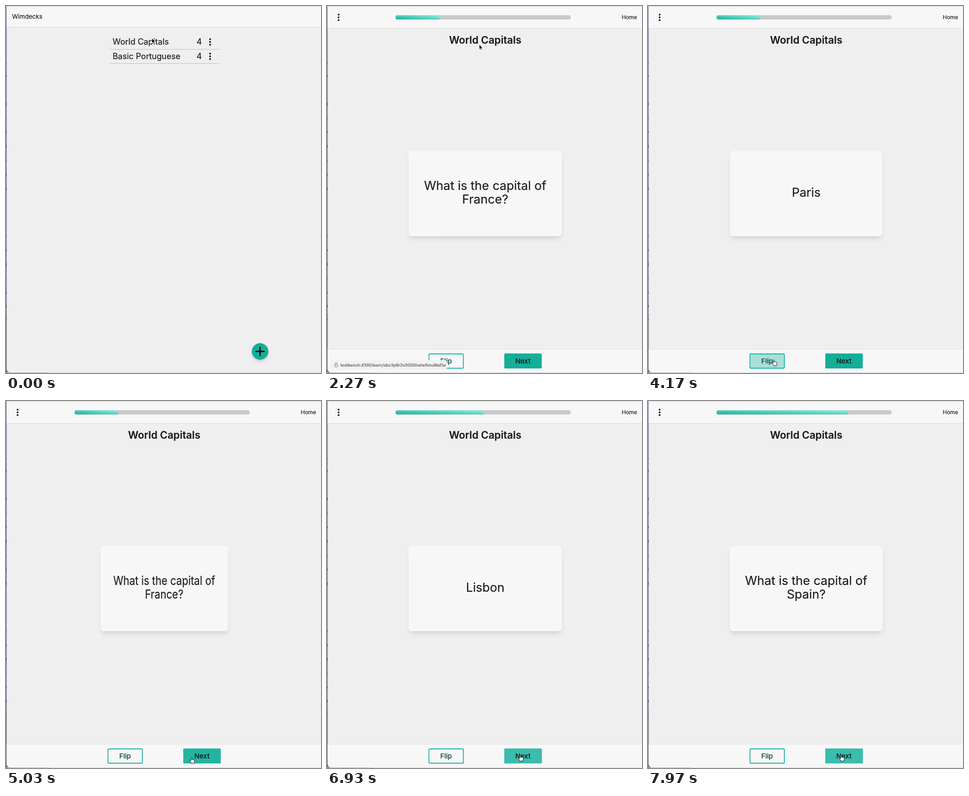
Write an HTML page that moves like this. It is 693 by 808 pixels and loops after 8000 ms.

```html
<!DOCTYPE html>
<html lang="en">
<head>
<meta charset="utf-8">
<title>Flashcards</title>
<style>
  html, body { margin: 0; width: 100%; height: 100%; overflow: hidden; background: #efefef; }
  svg { display: block; width: 100vw; height: 100vh; }
  text {
    --ink: #1c1c1e;
    font-family: Inter, Roboto, sans-serif; font-optical-sizing: none; white-space: pre;
    fill: var(--ink); stroke: var(--ink); stroke-width: .2;
  }
  .mid { text-anchor: middle; }
  .row { font-size: 18px; }
  .btn { font-size: 15px; font-weight: 500; text-anchor: middle; }
  .face { font-size: 27px; text-anchor: middle; }
</style>
</head>
<body>
<svg viewBox="0 0 693 808" preserveAspectRatio="none">
  <defs>
    <linearGradient id="teal" x1="0" y1="1" x2="1" y2="0">
      <stop offset="0" stop-color="#14ae99"/>
      <stop offset="1" stop-color="#93f1de"/>
    </linearGradient>
    <filter id="soft" x="-20%" y="-20%" width="140%" height="140%"><feGaussianBlur stdDeviation="5.6"/></filter>
    <filter id="tight" x="-20%" y="-20%" width="140%" height="140%"><feGaussianBlur stdDeviation="2.25"/></filter>
    <clipPath id="track"><rect x="150.5" y="20.3" width="386" height="9.4" rx="4.7"/></clipPath>
    <clipPath id="win"><path d="M1.5 1H693V807H9.5a8 8 0 0 1-8-8z"/></clipPath>
    <g id="dots"><circle cy="-6" r="2"/><circle r="2"/><circle cy="6" r="2"/></g>
  </defs>

  <rect width="693" height="808" fill="#d6d3de"/>
  <rect width="693" height="1" fill="#cbc5e2"/>
  <rect y="1" width="12" height="675" fill="#7d7596"/>
  <rect y="676" width="12" height="132" fill="#6d6780"/>
  <rect y="806" width="93" height="2" fill="#a9a5b2"/>
  <g id="specks" fill="#26222e"></g>

  <g clip-path="url(#win)">
    <rect width="693" height="808" fill="#efefef"/>

    <g id="home">
      <rect width="693" height="46" fill="#f7f7f7"/>
      <rect y="46" width="693" height="1" fill="#dcdcdc"/>
      <text x="13.3" y="28" font-size="13.5">Wimdecks</text>
      <rect id="rowHover" x="227.5" y="64" width="241" height="31" fill="#dfe1e5"/>
      <g id="rows"></g>
      <circle cx="559" cy="765" r="16" opacity=".16" filter="url(#soft)"/>
      <circle cx="559" cy="763" r="16" opacity=".14" filter="url(#tight)"/>
      <circle cx="559" cy="760.5" r="18.2" fill="#14ae99"/>
      <path d="M549.8 760.5h18.4M559 751.3v18.4" stroke="#111" stroke-width="3" stroke-linecap="round"/>
    </g>

    <g id="study">
      <rect width="693" height="49" fill="#f7f7f7"/>
      <rect y="49" width="693" height="1" fill="#dadada"/>
      <use href="#dots" x="25.5" y="25" fill="#111"/>
      <g clip-path="url(#track)">
        <rect x="150" y="20" width="387" height="10" fill="#c9c9cb"/>
        <rect id="bar" x="150.5" y="20.3" height="9.4" fill="url(#teal)"/>
      </g>
      <text x="648.5" y="29.4" font-size="12">Home</text>
      <text class="mid" x="348" y="83" font-size="22.5" font-weight="600">World Capitals</text>

      <g id="card">
        <rect x="-166.25" y="328.75" width="332.5" height="183.5" rx="7" opacity=".1" filter="url(#soft)"/>
        <rect x="-165.5" y="325" width="331" height="182" rx="7" opacity=".1" filter="url(#tight)"/>
        <rect x="-168.5" y="319" width="337" height="188" rx="7.5" fill="#f7f7f7"/>
        <g id="front">
          <text class="face" y="405">What is the capital of</text>
          <text class="face" y="435" id="place"></text>
        </g>
        <text class="face" y="420" id="answer"></text>
      </g>

      <rect y="755" width="693" height="53" fill="#f7f7f7"/>
      <rect y="755" width="693" height="1" fill="#e2e2e2"/>
      <rect id="flipHover" x="224" y="765.5" width="76.5" height="32.5" rx="2" fill="#a8e0d7"/>
      <rect x="224.3" y="766" width="75.7" height="31.5" rx="2" fill="none" stroke="#14b09d" stroke-width="1.8"/>
      <text class="btn" x="262" y="787" style="--ink:#134e46">Flip</text>
      <rect x="390" y="765" width="82.5" height="33" rx="2.5" fill="#14ae99"/>
      <rect id="nextHover" x="390" y="765" width="82.5" height="33" rx="2.5" fill="#3abdac"/>
      <text class="btn" x="431" y="787" style="--ink:#0f1f1d">Next</text>
    </g>

    <g id="status">
      <rect x="8" y="779.5" width="256" height="21" rx="5" fill="#f2f2f2" opacity=".95"/>
      <rect x="17" y="789.5" width="6.5" height="5" rx="1" fill="none" stroke="#666"/>
      <path d="M18.3 789.5v-2a2 2 0 0 1 4 0v2" fill="none" stroke="#666"/>
      <text x="29.5" y="793.7" font-size="9" font-weight="500" style="--ink:#666">testbench:4100/learn/abz3p8r2v0000hwte5mu9kd1w</text>
    </g>
  </g>

  <g id="cursor" stroke-linejoin="round">
    <path id="arrow" d="M0 0V10.6L2.5 8.4 4.1 12 6 11.2 4.4 7.7H7.7z" fill="#000" stroke="#fff" stroke-width=".8"/>
    <path id="hand" d="M-1.2 7.3V1.2a1.1 1.1 0 0 1 2.2 0V4.8c.5-.9 2-.7 2.2.2.6-.7 1.8-.4 2 .4.7-.5 1.7 0 1.7 1 0 2.2-.3 3.4-1.2 4.6V13H-.2V11.8C-1.5 10.5-3 8.2-4 6.9c-.6-1 .6-2 1.6-1.2z" fill="#fff" stroke="#000" stroke-width=".95"/>
  </g>
</svg>

<script>
const LOOP = 8000, OPEN = 2270;
const $ = id => document.getElementById(id);
const clamp = p => Math.max(0, Math.min(1, p));
const smooth = p => p * p * (3 - 2 * p);

// CSS "ease": cubic-bezier(.25, .1, .25, 1)
function ease(p) {
  p = clamp(p);
  if (p === 0 || p === 1) return p;
  const curve = (s, a, b) => 3 * s * (1 - s) * (1 - s) * a + 3 * s * s * (1 - s) * b + s * s * s;
  let lo = 0, hi = 1;
  for (let i = 0; i < 24; i++) {
    const s = (lo + hi) / 2;
    if (curve(s, .25, .25) < p) lo = s; else hi = s;
  }
  return curve(lo, .1, 1);
}
const ramp = (t, start, length) => ease((t - start) / length);

const decks = ['World Capitals', 'Basic Portuguese'];
const cards = [['France?', 'Paris'], ['Portugal?', 'Lisbon'], ['Spain?', 'Madrid']];
const flips = [3711, 4724, 6000, 7300];
const nexts = [5330, 7300];
const hovers = {
  rowHover: [[90, OPEN]],
  flipHover: [[3340, 4825], [5860, 6545]],
  nextHover: [[4994, 5640], [6710, LOOP + 1]]
};
// time, x, y of the pointer tip
const path = [
  [70, 321, 71], [500, 335, 85], [2360, 335, 85], [2900, 367, 641], [3000, 366, 645],
  [3480, 277, 779], [4750, 277, 779], [5030, 408, 785], [5180, 425, 780],
  [5540, 425, 780], [5960, 277, 780], [6450, 277, 780], [6820, 425, 780]
];

$('rows').innerHTML = decks.map((name, i) => {
  const y = 79 + i * 31.7;
  return `<text class="row" x="234.6" y="${y + 6.3}">${name}</text>
    <text class="row" x="419.3" y="${y + 6.3}">4</text>
    <use href="#dots" x="449" y="${y}" fill="#111"/>
    <rect x="227.5" y="${Math.round(y + 15.6)}" width="241" height="1" fill="#bdbdc0"/>`;
}).join('');

$('specks').innerHTML = [127, 154, 216, 247, 278, 309, 340, 371, 402, 507, 538, 569, 600, 631, 661, 690]
  .map((y, i) => `<rect y="${y - (i % 3) - 1}" width="1.3" height="${2 + i % 3 * 2}"/>`).join('');

const show = (id, on) => $(id).setAttribute('display', on ? 'inline' : 'none');
const fade = (id, value) => $(id).setAttribute('opacity', value.toFixed(3));

function pointer(t) {
  const i = path.findIndex(k => k[0] > t);
  if (i === 0) return path[0].slice(1);
  if (i < 0) return path[path.length - 1].slice(1);
  const [t0, x0, y0] = path[i - 1], [t1, x1, y1] = path[i];
  const p = smooth((t - t0) / (t1 - t0));
  return [x0 + (x1 - x0) * p, y0 + (y1 - y0) * p];
}

function draw(t) {
  show('home', t < OPEN);
  show('study', t >= OPEN);

  let hand = false;
  for (const id in hovers) {
    let level = 0;
    for (const [a, b] of hovers[id]) {
      if (t >= a) level = ramp(t, a, 150) * (1 - ramp(t, b, 150));
      hand = hand || (t >= a && t < b);
    }
    fade(id, level);
  }

  const turn = flips.reduce((sum, at, i) => sum + (i % 2 ? -1 : 1) * ramp(t, at, 600), 0);
  const c = Math.cos(Math.PI * turn);
  $('card').setAttribute('transform', `translate(348 0) scale(${Math.max(.001, Math.abs(c)).toFixed(4)} 1)`);
  show('front', c >= 0);
  show('answer', c < 0);

  const [place, answer] = cards[nexts.filter(at => t >= at).length];
  $('place').textContent = place;
  $('answer').textContent = answer;

  const done = nexts.reduce((sum, at) => sum + ramp(t, at, 300), 1) / 4;
  $('bar').setAttribute('width', (386 * done).toFixed(2));

  fade('status', clamp((t - 1620) / 250) * clamp((3000 - t) / 350));

  const [x, y] = pointer(t);
  $('cursor').setAttribute('transform', `translate(${x.toFixed(2)} ${y.toFixed(2)})`);
  show('hand', hand);
  show('arrow', !hand);
}

const start = performance.now();
function tick() {
  draw((performance.now() - start) % LOOP);
  requestAnimationFrame(tick);
}
draw(0);
requestAnimationFrame(tick);
</script>
</body>
</html>
```
